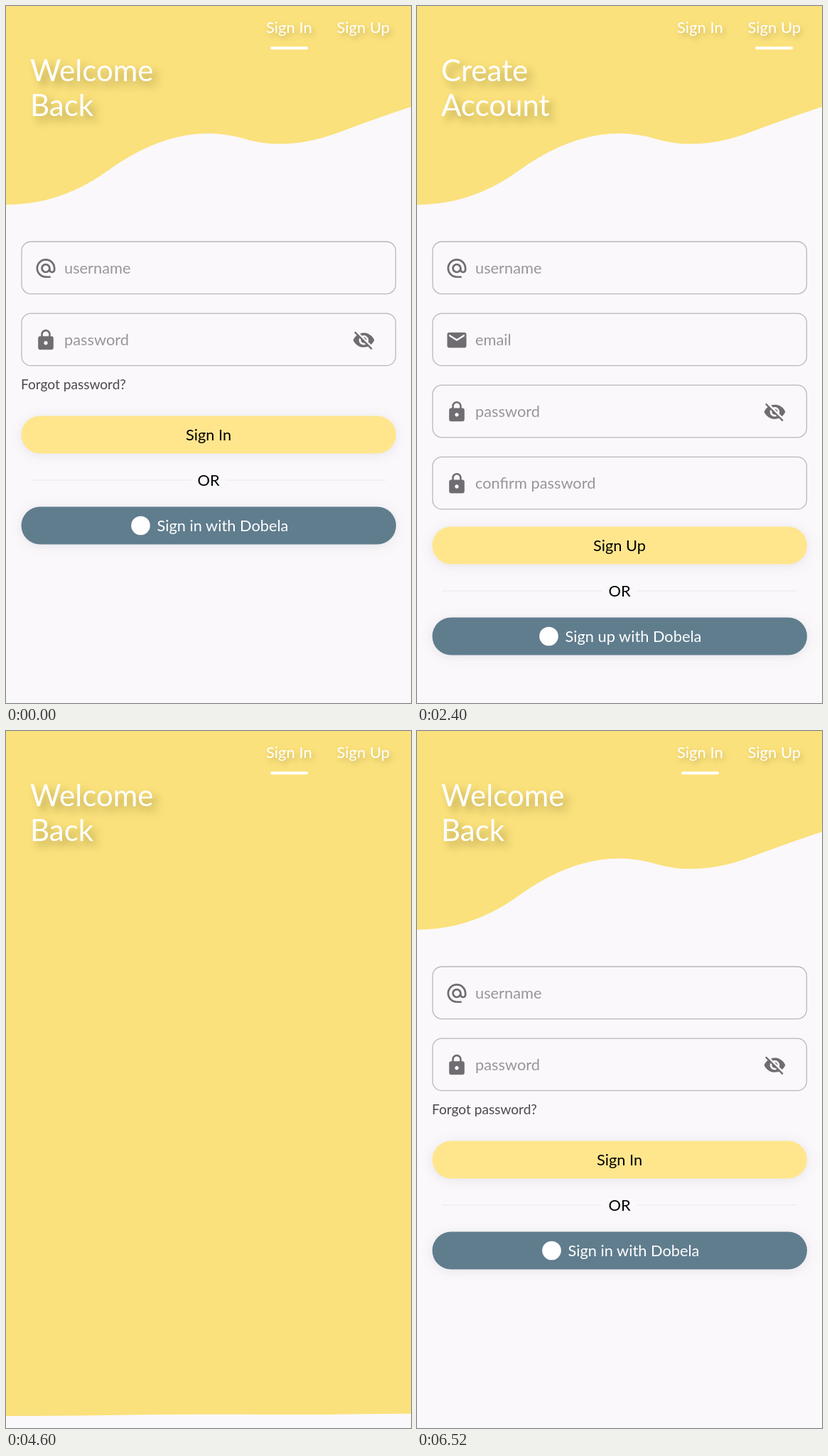
Write an HTML page that moves like this. It is 570 px wide and 982 px high and loops after 6.6 s.

```html
<!DOCTYPE html>
<html lang="en">
<head>
<meta charset="utf-8">
<title>Sign in</title>
<style>
  html, body { margin: 0; width: 100%; height: 100%; overflow: hidden; background: #faf8fb; }
  svg { display: block; width: 570px; height: 982px; font-family: Lato, "Open Sans", sans-serif; font-size: 21.8px; }
  .field { fill: none; stroke: #b9b7bb; stroke-width: 1.3; }
  .hint { fill: #98969a; }
  .icon { fill: #6f6d72; }
  .mid { text-anchor: middle; }
  .rule { stroke: #e9e7ea; stroke-width: 1; }
  .soft { filter: drop-shadow(0 2px 8px rgba(60, 50, 70, .1)); }
  .head { fill: #fff; font-size: 42px; filter: drop-shadow(7px 7px 6px rgba(70, 55, 0, .36)); }
  .tab { fill: #fff; font-size: 22px; filter: drop-shadow(3px 4px 3.5px rgba(70, 55, 0, .26)); }
</style>
</head>
<body>
<svg id="stage" viewBox="0 0 570 982">
  <rect width="570" height="982" fill="#faf8fb"/>
  <g id="signIn"></g>
  <g id="signUp"></g>
  <path id="wave" fill="#fae17c"/>
  <g class="head">
    <text id="line1" x="34" y="106"></text>
    <text id="line2" x="34" y="155"></text>
  </g>
  <g class="tab">
    <text x="366" y="38">Sign In</text>
    <text x="465.5" y="38">Sign Up</text>
  </g>
  <rect id="bar" y="57.2" width="53" height="4" rx="2" fill="#fff"/>
</svg>
<script>
const LOOP = 6600, STEP = 40, HALF = 800;
const TO_UP = 589, TO_IN = 3642;   // when each sweep begins
const W = 570, H = 982;

const icons = {
  at: 'M12 2C6.48 2 2 6.48 2 12s4.48 10 10 10h5v-2h-5c-4.34 0-8-3.66-8-8s3.66-8 8-8 8 3.66 8 8v1.43c0 .79-.71 1.57-1.5 1.57s-1.5-.78-1.5-1.57V12c0-2.76-2.24-5-5-5s-5 2.24-5 5 2.24 5 5 5c1.38 0 2.64-.56 3.54-1.47.65.89 1.77 1.47 2.96 1.47 1.97 0 3.5-1.6 3.5-3.57V12c0-5.52-4.48-10-10-10zm0 13c-1.66 0-3-1.34-3-3s1.34-3 3-3 3 1.34 3 3-1.34 3-3 3z',
  mail: 'M20 4H4c-1.1 0-2 .9-2 2v12c0 1.1.9 2 2 2h16c1.1 0 2-.9 2-2V6c0-1.1-.9-2-2-2zm0 4l-8 5-8-5V6l8 5 8-5v2z',
  lock: 'M18 8h-1V6c0-2.76-2.24-5-5-5S7 3.24 7 6v2H6c-1.1 0-2 .9-2 2v10c0 1.1.9 2 2 2h12c1.1 0 2-.9 2-2V10c0-1.1-.9-2-2-2zm-6 9c-1.1 0-2-.9-2-2s.9-2 2-2 2 .9 2 2-.9 2-2 2zm3.1-9H8.9V6c0-1.71 1.39-3.1 3.1-3.1s3.1 1.39 3.1 3.1v2z',
  eyeOff: 'M12 7c2.76 0 5 2.24 5 5 0 .65-.13 1.26-.36 1.83l2.92 2.92c1.51-1.26 2.7-2.89 3.43-4.75-1.73-4.39-6-7.5-11-7.5-1.4 0-2.74.25-3.98.7l2.16 2.16C10.74 7.13 11.35 7 12 7zM2 4.27l2.28 2.28.46.46C3.08 8.3 1.78 10.02 1 12c1.73 4.39 6 7.5 11 7.5 1.55 0 3.03-.3 4.38-.84l.42.42L19.73 22 21 20.73 3.27 3 2 4.27zM7.53 9.8l1.55 1.55c-.05.21-.08.43-.08.65 0 1.66 1.34 3 3 3 .22 0 .44-.03.65-.08l1.55 1.55c-.67.33-1.41.53-2.2.53-2.76 0-5-2.24-5-5 0-.79.2-1.53.53-2.2zm4.31-.78l3.15 3.15.02-.16c0-1.66-1.34-3-3-3l-.17.01z'
};

const $ = id => document.getElementById(id);
const icon = (name, x, y) =>
  `<path class="icon" transform="translate(${x} ${y}) scale(1.35)" d="${icons[name]}"/>`;

function field(row, name, label, eye) {
  const y = 332 + row * 101.1;
  return `<rect class="field" x="22" y="${y}" width="526.4" height="73.6" rx="13"/>`
    + icon(name, 39.8, y + 21.4)
    + `<text class="hint" x="82" y="${y + 45}">${label}</text>`
    + (eye ? icon('eyeOff', 487.3, y + 21.4) : '');
}

const pill = (y, color) =>
  `<rect class="soft" x="21.5" y="${y}" width="527.5" height="53" rx="26.5" fill="${color}"/>`;

function actions(y, label, other, dotX) {
  return pill(y, '#ffe68d')
    + `<text class="mid" x="285" y="${y + 34.5}">${label}</text>`
    + `<path class="rule" d="M35 ${y + 90.5}H260M310 ${y + 90.5}H535"/>`
    + `<text class="mid" x="285" y="${y + 98.5}">OR</text>`
    + pill(y + 128, '#607d8e')
    + `<circle cx="${dotX}" cy="${y + 154.5}" r="13.3" fill="#fff"/>`
    + `<text x="${dotX + 23}" y="${y + 162.5}" fill="#fff">${other}</text>`;
}

$('signIn').innerHTML = field(0, 'at', 'username') + field(1, 'lock', 'password', true)
  + '<text x="21" y="539.5" font-size="19.1" fill="#4c4a4e">Forgot password?</text>'
  + actions(577.5, 'Sign In', 'Sign in with Dobela', 189.5);
$('signUp').innerHTML = field(0, 'at', 'username') + field(1, 'mail', 'email')
  + field(2, 'lock', 'password', true) + field(3, 'lock', 'confirm password')
  + actions(733.5, 'Sign Up', 'Sign up with Dobela', 185.5);

// cubic-bezier(.4, 0, .2, 1)
function ease(x) {
  let lo = 0, hi = 1;
  for (let i = 0; i < 30; i++) {
    const s = (lo + hi) / 2, r = 1 - s;
    if (1.2 * r * r * s + 0.6 * r * s * s + s * s * s < x) lo = s; else hi = s;
  }
  return lo * lo * (3 - 2 * lo);
}

// down and back along the same curve
function sweep(t, start) {
  const k = 1 - Math.abs((t - start) / HALF - 1);
  return k > 0 ? ease(k) : 0;
}

function wavePath(p) {
  const at = (x, y) => `${x} ${(y + (H - y) * p).toFixed(2)} `;
  return `M0 0L${at(0, 280)}Q${at(77, 280)}${at(142.5, 232.5)}`
    + `Q${at(243, 159.5)}${at(335, 187)}Q${at(396.5, 205.5)}${at(470, 177.5)}`
    + `Q${at(520, 158.5)}${at(W, 142)}V0Z`;
}

function draw(now) {
  const t = Math.floor((now % LOOP) / STEP) * STEP;
  const up = t >= TO_UP + HALF && t < TO_IN + HALF;
  $('wave').setAttribute('d', wavePath(sweep(t, TO_UP) + sweep(t, TO_IN)));
  $('signIn').style.display = up ? 'none' : '';
  $('signUp').style.display = up ? '' : 'none';
  $('line1').textContent = up ? 'Create' : 'Welcome';
  $('line2').textContent = up ? 'Account' : 'Back';
  $('bar').setAttribute('x', up ? 476 : 372);
}

function tick() {
  draw(performance.now());
  requestAnimationFrame(tick);
}
tick();
</script>
</body>
</html>
```
